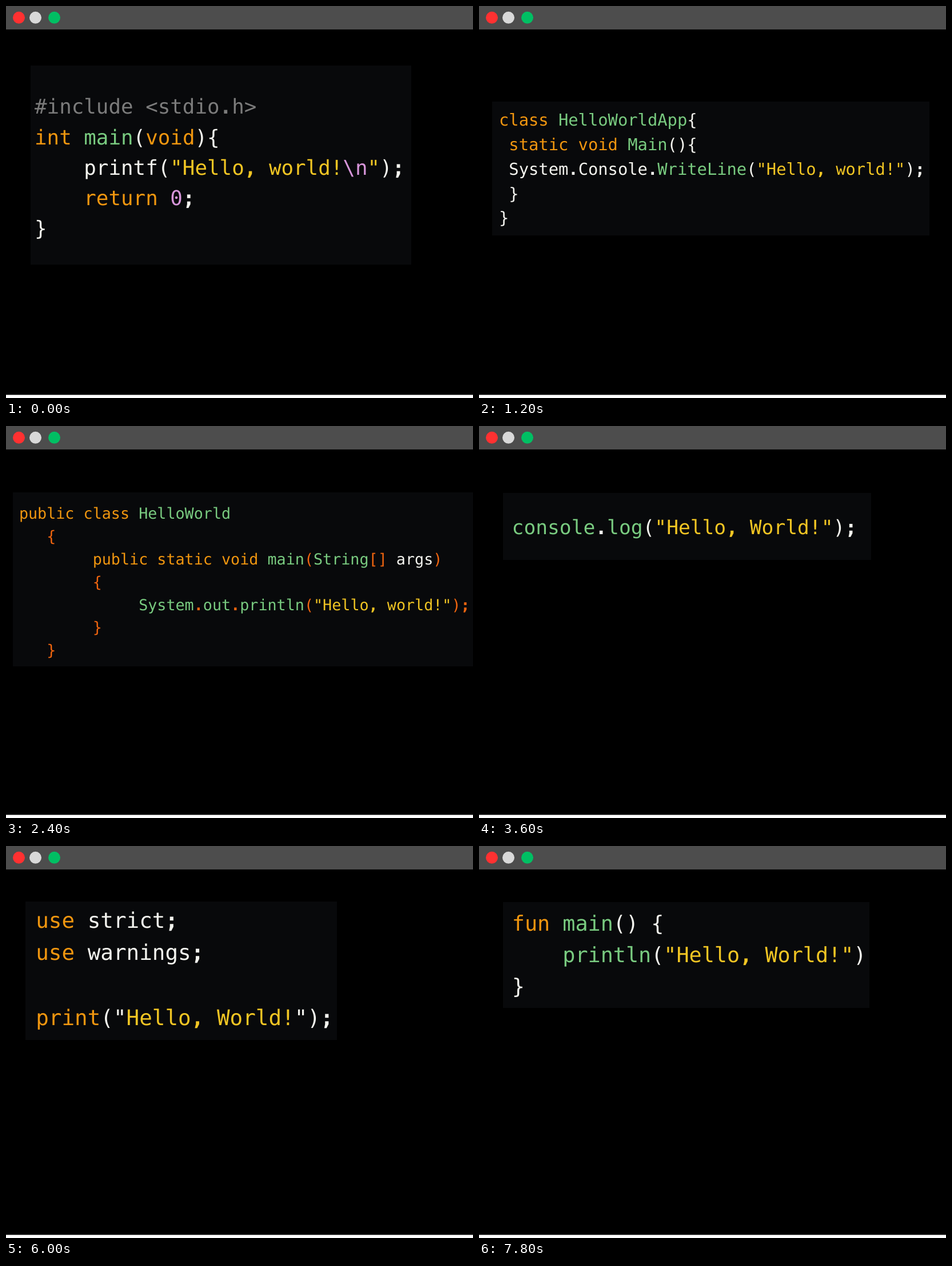
Write an HTML page that moves like this. It is 817 by 685 pixels and loops after 8 s.

```html
<!DOCTYPE html>
<html lang="en">
<head>
<meta charset="utf-8">
<title>Hello, World!</title>
<style>
  html, body { margin: 0; width: 100%; height: 100%; overflow: hidden; background: #fff; }
  svg { display: block; width: 817px; height: 685px; }
  text {
    font-family: "DejaVu Sans Mono", monospace;
    white-space: pre;
    text-rendering: geometricPrecision;
  }
  .dot { font-weight: bold; }
</style>
</head>
<body>
<svg id="stage" viewBox="0 0 817 685">
  <rect width="817" height="679.5"/>
  <rect width="817" height="41" fill="#4d4d4d"/>
  <circle cx="22.5" cy="20.3" r="10.5" fill="#ff3131"/>
  <circle cx="51.5" cy="20.3" r="10.5" fill="#d9d9d9"/>
  <circle cx="84.5" cy="20.3" r="10.5" fill="#00bf63"/>
</svg>
<script>
const HOLD = 600, LOOP = 8000;
const colors = {
  w: '#f4f4ef', o: '#f0960f', g: '#79cb80', y: '#f1c523',
  p: '#d795da', r: '#f2660f', c: '#7b7b7b'
};

// box: panel x, y, width, height; at: text x, first baseline, font size, line step.
// "~" plus a letter switches the colour.
const slides = [
  { box: [43, 104, 666, 348], at: [50, 188.2, 35.85, 53.3], code: [
    '~c#include <stdio.h>',
    '~oint ~gmain~w(~ovoid~w){',
    '    ~wprintf(~y"Hello, world!~p\\n~y"~w);',
    '    ~oreturn ~p0~w;',
    '~w}'] },
  { box: [43, 167, 712, 234], at: [51, 204, 26, 39], code: [
    '~c#include <iostream>',
    '~oint ~gmain~w(){',
    '  ~wstd::cout << ~y"Hello, world!"~w << std::endl;',
    '  ~oreturn ~p0~w;',
    '~w}'] },
  { box: [23, 167, 765, 234], at: [35, 209.4, 28.79, 42.7], code: [
    '~oclass ~gHelloWorldApp~w{',
    ' ~ostatic void ~gMain~w(){',
    ' ~wSystem.Console.~gWriteLine~w(~y"Hello, world!"~w);',
    ' ~w}',
    '~w}'] },
  { box: [23, 167, 765, 234], at: [37, 209.4, 28, 42.7], code: [
    '~oModule ~gHello',
    '    ~oSub ~gMain~w()',
    '        ~wConsole.~gWriteLine~w(~y"Hello, world!"~w)',
    '    ~oEnd Sub',
    '~oEnd Module'] },
  { box: [12, 116, 805, 304], at: [22.9, 162.4, 26.74, 39.8], code: [
    '~opublic class ~gHelloWorld',
    '   ~r{',
    '        ~opublic static void ~gmain~r(~gString~r[] ~wargs~r)',
    '        ~r{',
    '             ~gSystem~r.~gout~r.~gprintln~r(~y"Hello, world!"~r);',
    '        ~r}',
    '   ~r}'] },
  { box: [42, 117, 644, 150], at: [56, 182.5, 26.5, 52], code: [
    '~olet ~wmessage: ~gstring ~w= ~y"Hello, World!"~w;',
    '~gconsole~w.~glog~w(message);'] },
  { box: [42, 117, 644, 117], at: [57.6, 189, 34.57, 52], code: [
    '~gconsole~w.~glog~w(~y"Hello, World!"~w);'] },
  { box: [42, 107, 604, 116], at: [52, 174.2, 33, 50], code: [
    '~o<?php echo ~y"Hello, World!"~w;~o?>'] },
  { box: [42, 107, 438, 116], at: [48.3, 174.2, 34.6, 52], code: [
    '~wcat(~y"Hello, World!"~w)'] },
  { box: [42, 90, 699, 182], at: [51, 135, 37.6, 56.5], code: [
    '~ofn ~gmain~w() {',
    '    ~gprintln!~w(~y"Hello, World!"~w);',
    '~w}'] },
  { box: [34, 97, 545, 242], at: [52.2, 142.6, 37.6, 56.8], code: [
    '~ouse ~wstrict;',
    '~ouse ~wwarnings;',
    '',
    '~oprint~w("~yHello, World!~w");'] },
  { box: [42, 98, 500, 117], at: [57.8, 160, 37.2, 56], code: [
    '~gputs ~y"Hello, World!"'] },
  { box: [42, 98, 530, 117], at: [57.8, 178, 37.2, 56], code: [
    '~gprint~w(~y"Hello, World!"~w)'] },
  { box: [42, 98, 641, 185], at: [57.8, 148, 36.75, 55.1], code: [
    '~ofun ~gmain~w() {',
    '    ~gprintln~w(~y"Hello, World!"~w)',
    '~w}'] }
];

const stage = document.getElementById('stage');

function add(parent, tag, attrs) {
  const el = document.createElementNS('http://www.w3.org/2000/svg', tag);
  for (const k in attrs) el.setAttribute(k, attrs[k]);
  return parent.appendChild(el);
}

// Dots, commas and semicolons are set heavier than the rest.
function addRun(text, str, fill) {
  for (const bit of str.split(/([.,:;]+)/)) {
    if (!bit) continue;
    const span = add(text, 'tspan', { fill });
    span.textContent = bit;
    if (/[.,:;]/.test(bit)) span.setAttribute('class', 'dot');
  }
}

const groups = slides.map(({ box: [bx, by, width, height], at: [x, y, size, step], code }) => {
  const g = add(stage, 'g', { visibility: 'hidden' });
  add(g, 'rect', { x: bx, y: by, width, height, fill: '#08090b' });
  code.forEach((line, i) => {
    const text = add(g, 'text', { x, y: y + i * step, 'font-size': size });
    const [indent, ...parts] = line.split('~');
    text.append(indent);
    for (const part of parts) addRun(text, part.slice(1), colors[part[0]]);
  });
  return g;
});

let shown = -1;
const start = performance.now();

function draw(now) {
  const next = Math.floor(Math.max(0, now - start) % LOOP / HOLD);
  if (next !== shown) {
    if (shown >= 0) groups[shown].setAttribute('visibility', 'hidden');
    groups[next].setAttribute('visibility', 'visible');
    shown = next;
  }
  requestAnimationFrame(draw);
}
draw(start);
</script>
</body>
</html>
```
